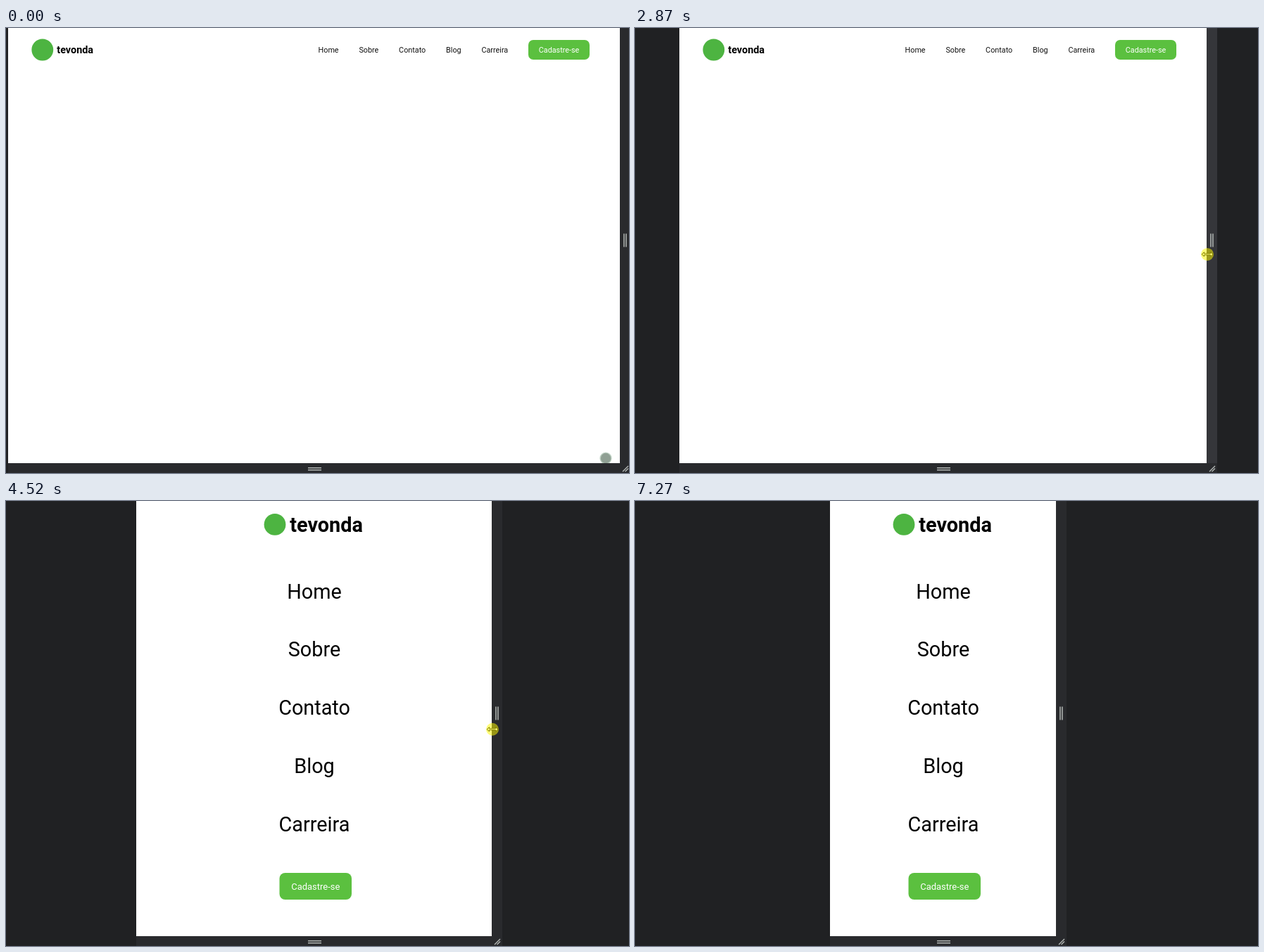
These frames come from a looping animation (885 by 633 pixels, 8000 ms). An HTML page with a canvas:

```html
<!DOCTYPE html>
<html lang="pt">
<head>
<meta charset="utf-8">
<title>Menu responsivo</title>
<style>
  html, body { margin: 0; width: 100%; height: 100%; overflow: hidden; background: #202123; }
  canvas { display: block; }
</style>
</head>
<body>
<canvas id="stage" width="885" height="633"></canvas>
<script>
const ctx = document.getElementById('stage').getContext('2d');
const LOOP = 8000, WIDTH = 885, HEIGHT = 633;
const FLOOR = 619, BAR = 15, MIRROR = 875, BREAKPOINT = 553;
const LINKS = ['Home', 'Sobre', 'Contato', 'Blog', 'Carreira'];
const BRAND = 'tevonda', ACTION = 'Cadastre-se';
const GREEN = '#5bc03f', LOGO = '#4db441', GRIP = '#b4b8b6';
const BACKDROP = '#202123', BAR_COLOR = '#292a2d', BAR_HOVER = '#35363a';

// Moments of the gesture: enter the frame, press, drag, release, leave.
const ENTER = 70, REACH = 900, PRESS = 1330, DRAG = 1850, RELEASE = 6440, LEAVE = 7270;
// Key points of the dragged right edge: [time, x]
const EDGE = [[DRAG, 872], [2590, 839], [2870, 812], [3630, 760],
  [4250, 705], [4520, 690], [5140, 644], [5900, 607], [6300, 598]];

const mix = (a, b, u) => a + (b - a) * u;
const progress = (t, from, to) => Math.min(1, Math.max(0, (t - from) / (to - from)));
const smooth = u => u * u * (3 - 2 * u);

function edgeAt(t) {
  let x = EDGE[0][1];
  for (let i = 1; i < EDGE.length; i++) {
    x += (EDGE[i][1] - EDGE[i - 1][1]) * progress(t, EDGE[i - 1][0], EDGE[i][0]);
  }
  return Math.round(x);
}

function cursorAt(t, edge) {
  if (t < REACH) {
    const u = progress(t, ENTER, REACH);
    return [mix(853, 876, 1 - (1 - u) ** 4), mix(613, 310, smooth(u))];
  }
  if (t < DRAG) return [875, 310];
  const x = edge + mix(1, 4, progress(t, 4520, RELEASE));
  const y = 325 - 15 * Math.exp((DRAG - t) / 650);
  const u = smooth(progress(t, RELEASE, 7200));
  return [mix(x, 819, u), mix(y, 621, u)];
}

function rect(x, y, w, h, color) {
  ctx.fillStyle = color;
  ctx.fillRect(x, y, w, h);
}

function circle(x, y, r, color) {
  ctx.fillStyle = color;
  ctx.beginPath();
  ctx.arc(x, y, r, 0, 2 * Math.PI);
  ctx.fill();
}

function text(string, x, y, size, weight = 400, color = '#000', align = 'center') {
  ctx.font = `${weight} ${size}px Roboto, sans-serif`;
  ctx.fillStyle = color;
  ctx.textAlign = align;
  ctx.fillText(string, x, y);
}

function button(x, y, w, h, r, baseline, size) {
  ctx.fillStyle = GREEN;
  ctx.beginPath();
  ctx.roundRect(x, y, w, h, r);
  ctx.fill();
  text(ACTION, x + w / 2, baseline, size, 400, '#fff');
}

function outline(points) {
  ctx.beginPath();
  points.forEach(([x, y]) => ctx.lineTo(x, y));
  ctx.closePath();
  ctx.lineWidth = 1;
  ctx.fillStyle = '#fff';
  ctx.strokeStyle = '#000';
  ctx.fill();
  ctx.stroke();
}

function drawFrame(edge, hover) {
  const left = MIRROR - edge;
  rect(left, FLOOR, edge + BAR - left, HEIGHT - FLOOR, BAR_COLOR);
  rect(edge, 0, BAR, FLOOR, hover ? BAR_HOVER : BAR_COLOR);
  for (const offset of [0, 3]) {
    rect(edge + 5.2 + offset, 292.5, 1.5, 19, GRIP);
    rect(429, 625 + offset, 19, 1.5, GRIP);
  }
  ctx.strokeStyle = GRIP;
  ctx.lineWidth = 1.4;
  ctx.beginPath();
  for (const size of [8, 4.5]) {
    ctx.moveTo(edge + 12 - size, 631);
    ctx.lineTo(edge + 12, 631 - size);
  }
  ctx.stroke();
}

function drawWide(left, right) {
  circle(left + 48.8, 31, 15.4, LOGO);
  text(BRAND, left + 69.3, 36, 14.4, 700, '#000', 'left');
  let x = right - 43 - 87;
  button(x, 17, 87, 28, 7, 35, 10.8);
  for (const link of [...LINKS].reverse()) {
    text(link, x - 28.8, 35, 10.8, 400, '#111', 'right');
    x -= 28.8 + ctx.measureText(link).width;
  }
}

function drawNarrow() {
  circle(382, 33.4, 15.4, LOGO);
  text(BRAND, 403.3, 44, 28.8, 700, '#000', 'left');
  LINKS.forEach((link, i) => text(link, 438, Math.round(138.6 + i * 82.8), 28.8));
  button(388.5, 529, 102.5, 38, 8, 553, 12.96);
}

function drawPage(left, right, wide, t) {
  ctx.save();
  ctx.beginPath();
  ctx.rect(left, 0, right - left, FLOOR);
  ctx.clip();
  rect(left, 0, right - left, FLOOR, '#fff');
  if (t < ENTER) {
    circle(852, 612, 8.6, '#bccfc1');
    circle(852, 612, 7.2, '#90a094');
  } else {
    circle(852, 612, 9, t < DRAG + 100 ? '#f6f6f6' : '#fff');
  }
  if (wide) drawWide(left, right);
  else drawNarrow();
  ctx.restore();
}

function drawCursor(t, edge) {
  if (t < ENTER || t >= LEAVE) return;
  ctx.save();
  ctx.translate(...cursorAt(t, edge));
  if (t < RELEASE) {
    const half = [[4.5, -1], [4.5, -3], [8, 0], [4.5, 3], [4.5, 1]];
    outline([...half, ...half.map(([x, y]) => [-x, -y])]);
    if (t >= PRESS) circle(0, 0, 9, 'rgba(255, 250, 0, 0.52)');
  } else {
    outline([[0, 0], [0, 12], [3.4, 8.6], [8.5, 8.5]]);
  }
  ctx.restore();
}

function draw(t) {
  const right = edgeAt(t), left = MIRROR - right;
  const wide = right - left > BREAKPOINT;
  rect(0, 0, WIDTH, HEIGHT, BACKDROP);
  drawFrame(right, t >= DRAG && wide);
  drawPage(left, right, wide, t);
  drawCursor(t, right);
}

const start = performance.now();
function tick() {
  draw((performance.now() - start) % LOOP);
  requestAnimationFrame(tick);
}
tick();
</script>
</body>
</html>
```
